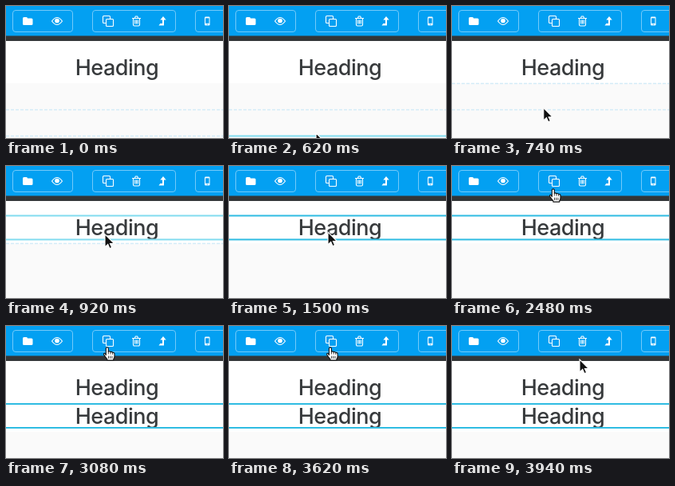
An HTML page that plays this animation: 272x166 px, repeating every 3960 ms.

```html
<!DOCTYPE html>
<html lang="en">
<head>
<meta charset="utf-8">
<title>Duplicate a heading</title>
<style>
html, body { margin: 0; width: 100%; height: 100%; overflow: hidden; background: #fafafa; }
svg { display: block; }
text { font: 500 27px Inter, "Liberation Sans", sans-serif; letter-spacing: -.48px; font-optical-sizing: none; text-anchor: middle; fill: #373a3c; }
.dash { stroke: #d3ebf7; stroke-width: 1.6; stroke-dasharray: 4 2; }
.hover { stroke: #82dcef; stroke-width: 2; }
.selected { stroke: #2fbce2; stroke-width: 2; }
</style>
</head>
<body>
<svg width="272" height="166" viewBox="0 0 272 166">
  <rect width="272" height="166" fill="#fafafa"/>
  <rect id="paper" y="43" width="272" height="54" fill="#fff"/>
  <text x="139" y="87">Heading</text>
  <text id="copy" x="139" y="123">Heading</text>
  <g id="lines"></g>

  <rect y="37" width="272" height="7" fill="#333638"/>
  <rect width="272" height="37.5" fill="#03a0f2"/>
  <g fill="none" stroke="#72cafa">
    <rect x="8.5" y="5.5" width="75" height="27" rx="3.5"/>
    <rect x="108.5" y="5.5" width="104" height="27" rx="3.5"/>
    <rect x="237.5" y="5.5" width="60" height="27" rx="3.5"/>
  </g>
  <g fill="#fff">
    <path d="M21 15.5q0-1.5 1.5-1.5h3q1.5 0 1.5 1.5h5q1.500 0 1.500 1.500v5.500q0 1.500-1.500 1.500h-9.500q-1.500 0-1.500-1.500z"/>
    <path d="M191.500 24.500h6.500v-7h2.700l-3.700-4.500-3.700 4.500h2.700v4.500h-2.700z"/>
    <rect x="249" y="13.500" width="6.500" height="11" rx="1.300"/>
    <rect x="250" y="15.300" width="4.500" height="6.500" fill="#03a0f2"/>
    <circle cx="252.200" cy="23.200" r=".6" fill="#03a0f2"/>
  </g>
  <g fill="none" stroke="#fff" stroke-width="1.100">
    <path d="M57.500 19q6.500-9 13 0-6.500 9-13 0z"/>
    <circle cx="64" cy="18.500" r="2.300" fill="#fff"/>
    <rect x="121.500" y="12.500" width="9" height="9" rx="1"/>
    <rect x="125.500" y="16.500" width="9" height="9" rx="1" fill="#03a0f2"/>
    <path d="M158 15.500h11M159.500 15.500v8q0 1.500 1.500 1.500h5q1.500 0 1.500-1.500v-8M161.500 15l.8-2h2.400l.8 2M161.700 17.500v5M163.500 17.500v5M165.300 17.500v5"/>
  </g>

  <g id="cursor">
    <path id="arrow" d="M0 0V15.800L3.700 12.400 6 17.700 8.600 16.600 6.400 11.500H11.300Z" fill="#111" stroke="#fff" stroke-width="1.100"/>
    <g id="hand" stroke="#111" stroke-width="1.100" stroke-linejoin="round" stroke-linecap="round">
      <path d="M-1.700 9.500V1.200Q-1.500-.2-.2-.2 1.200-.2 1.300 1.200V5.200Q2.700 4.200 4 5.700 5.500 4.900 6.600 6.400 9 6 9 8.300V11Q9 13 7.800 14.500V16H-.2V14.600Q-2 13-4.400 8.900-4.800 7.400-3.400 7.200-2.400 7.600-1.700 9.500Z" fill="#fff"/>
      <path d="M1.300 5.200V8M4 5.900V8.200M6.600 6.600V8.500M1.500 11V13.500M3.700 11V13.500M5.900 11V13.500" fill="none" stroke-width=".8"/>
    </g>
  </g>
</svg>
<script>
const LOOP = 3960;
const $ = id => document.getElementById(id);
const show = (id, on) => $(id).style.display = on ? "" : "none";

// Pointer path: time, x, y
const path = [
  [620, 109, 160], [700, 112, 141], [820, 120, 103], [920, 124, 86], [1140, 124, 83],
  [1900, 124, 83], [1980, 124, 69], [2080, 123, 45], [2200, 125, 35], [2360, 127, 30],
  [2440, 127, 30], [2580, 127, 27], [3620, 127, 27], [3780, 147, 36], [3940, 160, 42]
];

function pointer(t) {
  const i = path.findIndex(p => p[0] > t);
  if (i < 0) return path[path.length - 1].slice(1);
  const [t0, x0, y0] = path[Math.max(0, i - 1)], [t1, x1, y1] = path[i];
  const k = Math.max(0, (t - t0) / (t1 - t0));
  return [x0 + (x1 - x0) * k, y0 + (y1 - y0) * k];
}

const line = (kind, y) => `<path class="${kind}" d="M0 ${y}H272"/>`;

function outlines(t, y) {
  if (t >= 3080) return line("selected", 98) + line("selected", 128);
  if (t >= 1500) return line("selected", 62.5) + line("selected", 92.5);
  if (t < 620) return line("dash", 130.5) + line("dash", 163.5);
  if (y > 130) return line("dash", 130.5) + line("hover", 163.5);
  if (y > 97) return line("dash", 97.5) + line("dash", 130.5);
  return line("hover", 62.5) + line("hover", 92.5) + line("dash", 97.5);
}

function draw(now) {
  const t = now % LOOP, [x, y] = pointer(t);
  const copied = t >= 3080, overButton = y < 33;
  $("paper").setAttribute("height", copied ? 90 : 54);
  show("copy", copied);
  $("lines").innerHTML = outlines(t, y);
  show("cursor", t >= 620);
  show("arrow", !overButton);
  show("hand", overButton);
  $("cursor").setAttribute("transform", `translate(${x} ${y})`);
}

const start = performance.now();
function tick() {
  draw(performance.now() - start);
  requestAnimationFrame(tick);
}
tick();
</script>
</body>
</html>
```
